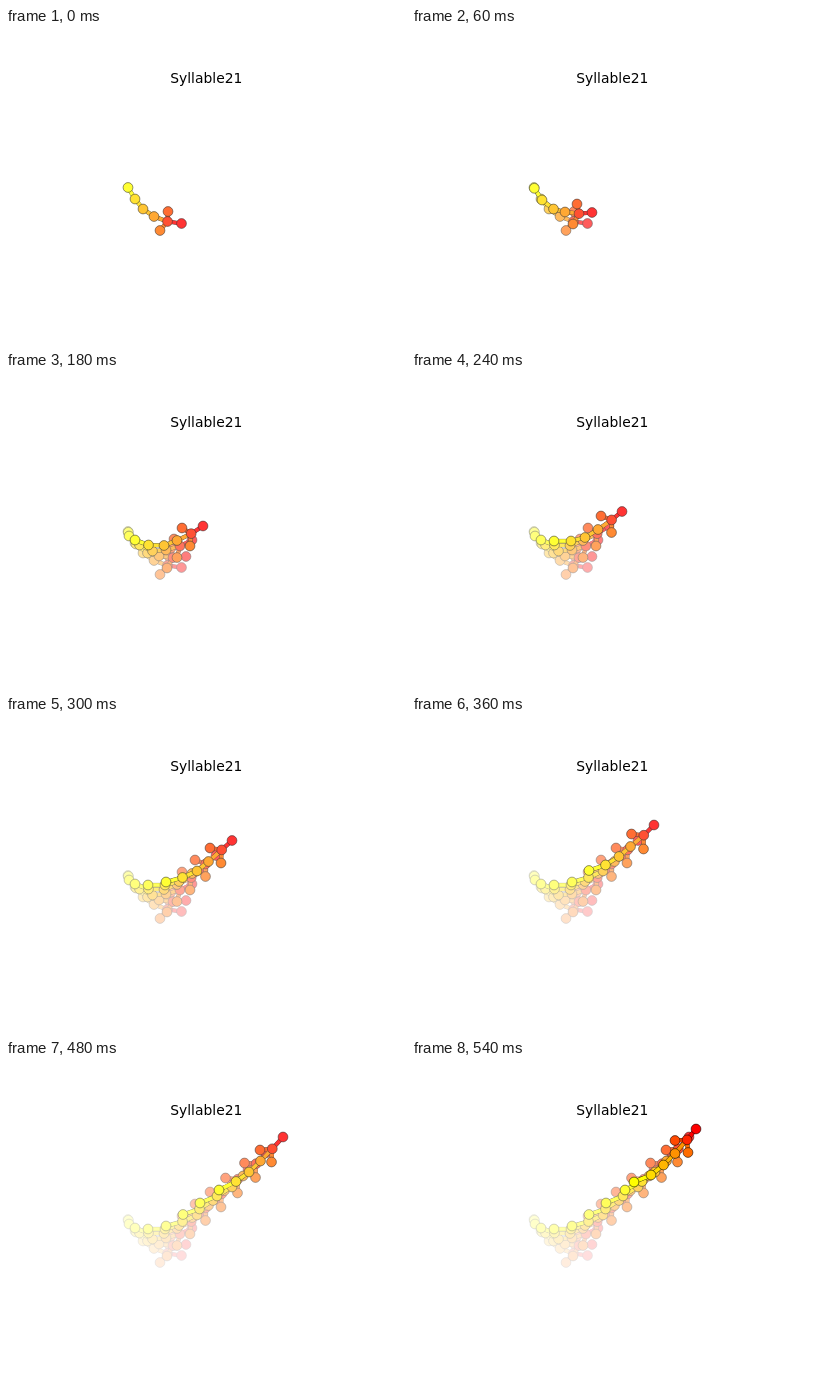
An HTML page with a canvas that plays this animation: 400x316 px, repeating every 600 ms.

```html
<!DOCTYPE html>
<html lang="en">
<head>
<meta charset="utf-8">
<title>Syllable21</title>
<style>
  html, body { margin: 0; width: 100%; height: 100%; overflow: hidden; background: #fff; }
  canvas, svg { position: absolute; left: 0; top: 0; width: 400px; height: 316px; }
  text { font: 13.89px "DejaVu Sans", sans-serif; text-anchor: middle; }
</style>
</head>
<body>
<canvas id="stage" width="400" height="316"></canvas>
<svg viewBox="0 0 400 316"><text x="200.3" y="55">Syllable21</text></svg>
<script>
const STEP = 60;
const ctx = document.getElementById('stage').getContext('2d');

// One row per pose: nose, two ears, then the spine down to the tail (x, y pairs).
const rows = [
  [175.5, 195.5, 162, 183.5, 154, 202.5, 148, 188.5, 137, 181, 129, 171, 122, 159.5],
  [180, 184.5, 165, 176, 161, 196, 153, 184, 141.5, 181, 130, 172, 122.3, 160.3],
  [186, 168, 168, 167, 171, 185.5, 160, 178, 146.5, 179, 133.5, 173, 123, 164],
  [197, 154, 176, 156, 184, 174, 171, 168.5, 158, 173.5, 142.5, 173, 129, 168],
  [210, 139.5, 189, 144, 199.5, 160.5, 186, 157.5, 173, 165.5, 159, 169, 142, 169],
  [226, 124.5, 204, 132, 215, 147, 202.5, 145.5, 191, 155, 176.5, 161.5, 160, 166],
  [242, 109, 219.5, 118, 231.5, 133, 218.5, 130.5, 207, 140.5, 193.5, 149, 177, 154.5],
  [260, 93, 238.5, 103, 249.5, 117.5, 237, 116, 226, 127, 211, 136, 194, 143],
  [277, 77, 254, 90, 265.5, 102, 254.5, 101, 243, 112, 230, 121.5, 213, 130],
  [284, 69, 263, 80.5, 276, 92.5, 263, 93.5, 251.5, 105, 239, 115, 222, 122]
];

// The neck lies between the ears, pulled towards the nose.
function toPose(row, i) {
  const pts = [];
  for (let j = 0; j < row.length; j += 2) pts.push([row[j], row[j + 1]]);
  const [nose, earA, earB] = pts;
  const pull = Math.min(0.38, 0.2 + 0.035 * i);
  const neck = [0, 1].map(a => {
    const mid = (earA[a] + earB[a]) / 2;
    return mid + pull * (nose[a] - mid);
  });
  pts.splice(1, 0, neck);
  return pts;
}

const poses = rows.map(toPose);
const bones = [[0, 1], [2, 1], [3, 1], [4, 1], [5, 4], [6, 5], [7, 6]];
const color = n => `rgb(255, ${Math.round(255 * n / 7)}, 0)`;

function drawBone(from, to, width, style) {
  ctx.lineWidth = width;
  ctx.strokeStyle = style;
  ctx.beginPath();
  ctx.moveTo(...from);
  ctx.lineTo(...to);
  ctx.stroke();
}

function drawPose(pose) {
  for (const [a, b] of bones) drawBone(pose[a], pose[b], 4.17, '#000');
  for (const [a, b] of bones) drawBone(pose[a], pose[b], 3.75, color(a));
  ctx.lineWidth = 0.56;
  ctx.strokeStyle = '#000';
  pose.forEach(([x, y], n) => {
    ctx.fillStyle = color(n);
    ctx.beginPath();
    ctx.arc(x, y, 4.9, 0, 2 * Math.PI);
    ctx.fill();
    ctx.stroke();
  });
}

function wash(alpha) {
  ctx.fillStyle = `rgba(255, 255, 255, ${alpha})`;
  ctx.fillRect(0, 0, 400, 316);
}

// Each pose is veiled in white before the next; the last one stays vivid.
function draw(last) {
  wash(1);
  for (let i = 0; i <= last; i++) {
    drawPose(poses[i]);
    if (i < poses.length - 1) wash(0.2);
  }
}

let shown = -1;
function tick() {
  const now = Math.floor(performance.now() / STEP) % poses.length;
  if (now !== shown) draw(shown = now);
  requestAnimationFrame(tick);
}
tick();
</script>
</body>
</html>
```
